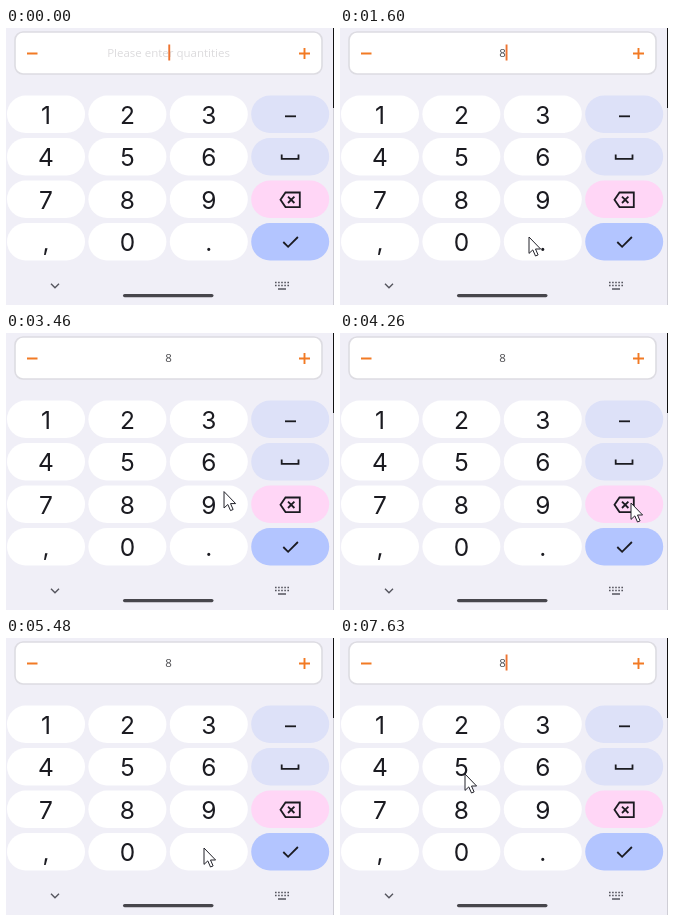
Recreate the animation shown at these times as an HTML page. Size 328 by 277 pixels, loop 8 s.

```html
<!DOCTYPE html>
<html lang="en">
<head>
<meta charset="utf-8">
<title>Quantity keypad</title>
<style>
  html, body { margin: 0; width: 100%; height: 100%; overflow: hidden; background: #f0eff7; }
  svg { display: block; width: 328px; height: 277px; }
  .digit { font: 400 24.5px Inter, sans-serif; fill: #1b1b21; text-anchor: middle; }
  .entry { font: 400 11.5px "Open Sans", sans-serif; text-anchor: middle; }
  .icon { fill: none; stroke: #1b1b21; stroke-width: 1.8; }
  .sign { fill: none; stroke: #f27a24; stroke-width: 1.9; }
</style>
</head>
<body>
<svg viewBox="0 0 328 277">
  <rect width="328" height="277" fill="#f0eff7"/>
  <rect x="9" y="4" width="307" height="42" rx="8" fill="#fff" stroke="#dddce2" stroke-width="1.6"/>
  <path class="sign" d="M21 25.5h10.5M293 25.5h11M298.5 20v11"/>
  <text id="entry" class="entry" x="162.5" y="29"></text>
  <rect id="caret" y="16.5" width="1.9" height="16" fill="#ee7431"/>

  <g id="keys"></g>
  <g class="icon">
    <path d="M279 88.3h11"/>
    <path d="M275.7 126.5v4.3h16.8v-4.3"/>
    <path d="M279.5 164.5h14.3v14.6h-14.3l-5-7.3zM282 168.6l6.4 6.4M288.4 168.6l-6.4 6.4"/>
    <path d="M277.3 214l4.8 4.8 9.8-9.8"/>
  </g>

  <path d="M45 255.7l4 4 4-4" fill="none" stroke="#55555e" stroke-width="1.4"/>
  <path d="M269 254.5h14M269 257.5h14" stroke="#55555e" stroke-width="1.6" stroke-dasharray="1.6 1.5"/>
  <path d="M272 261h8" stroke="#55555e" stroke-width="1.5"/>
  <rect x="117" y="266" width="90.5" height="3.2" rx="1.6" fill="#47464c"/>
  <path d="M327.5 0v80" stroke="#111"/>
  <path d="M327.5 80v197" stroke="#cfced6"/>

  <path id="pointer" d="M0 0V16.4L3.8 12.9 6.5 19 9.1 17.9 6.5 12H11.6Z"
        fill="#fff" stroke="#22222a" stroke-width="1" stroke-linejoin="round"/>
</svg>
<script>
const LOOP = 8000;
const $ = id => document.getElementById(id);

function add(parent, tag, attrs, text = '') {
  const node = document.createElementNS('http://www.w3.org/2000/svg', tag);
  for (const name in attrs) node.setAttribute(name, attrs[name]);
  node.textContent = text;
  return parent.appendChild(node);
}

const labels = ['1', '2', '3', '-', '4', '5', '6', 'space', '7', '8', '9', 'back', ',', '0', '.', 'done'];
const tints = { '-': '#dde1f8', space: '#dde1f8', back: '#ffd6f6', done: '#b3c5ff' };
const keys = {};
labels.forEach((label, i) => {
  const x = 1 + (i % 4) * 81.4, y = 67.5 + (i >> 2) * 42.5;
  const color = tints[label] || '#fff';
  const rect = add($('keys'), 'rect', { x, y, width: 78, height: 37.5, rx: 18.75 });
  keys[label] = { rect, color };
  if (!tints[label]) add($('keys'), 'text', { class: 'digit', x: x + 39, y: y + 28 }, label);
});

// Start time, entered text, caret visible
const entries = [
  [0, '', 1], [230, '', 0], [730, '', 1],
  [1260, '8', 1], [1780, '8', 0], [1900, '8.', 1], [2410, '8.', 0],
  [2620, '8', 1], [3130, '8', 0], [3630, '8', 1], [4120, '8', 0],
  [4300, '', 1], [4810, '', 0], [4960, '8', 1], [5480, '8', 0],
  [5760, '8.', 1], [6270, '8.', 0], [6660, '8', 1], [7170, '8', 0], [7630, '8', 1]
];

// Key, press time, release time
const presses = [
  ['8', 1160, 1260], ['.', 1790, 1900], ['4', 2520, 2620], ['back', 4300, 4390],
  ['8', 4870, 4960], ['.', 5660, 5760], ['5', 6520, 6660]
];

// Departure, arrival, then the point arrived at
const start = [81, 277];
const moves = [
  [410, 1020, 122, 175], [1270, 1600, 189, 209], [1920, 2450, 48, 132],
  [3130, 3650, 291, 170], [4350, 4810, 124, 177], [4980, 5340, 198, 210], [5780, 6270, 125, 136]
];

function pointerAt(t) {
  let [x, y] = start;
  for (const [from, to, toX, toY] of moves) {
    const p = Math.min(1, Math.max(0, (t - from) / (to - from)));
    const eased = p * p * (3 - 2 * p);
    x += (toX - x) * eased;
    y += (toY - y) * eased;
  }
  return [x, y];
}

function draw(t) {
  const [, text, caretOn] = entries.findLast(([time]) => time <= t);
  $('entry').textContent = text || 'Please enter quantities';
  $('entry').setAttribute('fill', text ? '#4a4a4e' : '#dcdbdd');
  $('caret').setAttribute('x', { '': 162.3, '8': 165.6, '8.': 167.6 }[text]);
  $('caret').setAttribute('opacity', caretOn);

  for (const label in keys) {
    const { rect, color } = keys[label];
    const pressed = presses.some(([key, down, up]) => key === label && t >= down && t < up);
    rect.setAttribute('fill', !pressed ? color : label === 'back' ? '#f5cbed' : '#dde1f8');
  }

  $('pointer').setAttribute('transform', `translate(${pointerAt(t)})`);
  $('pointer').setAttribute('visibility', t < moves[0][0] ? 'hidden' : 'visible');
}

const origin = performance.now();
function tick() {
  draw((performance.now() - origin) % LOOP);
  requestAnimationFrame(tick);
}
tick();
</script>
</body>
</html>
```
